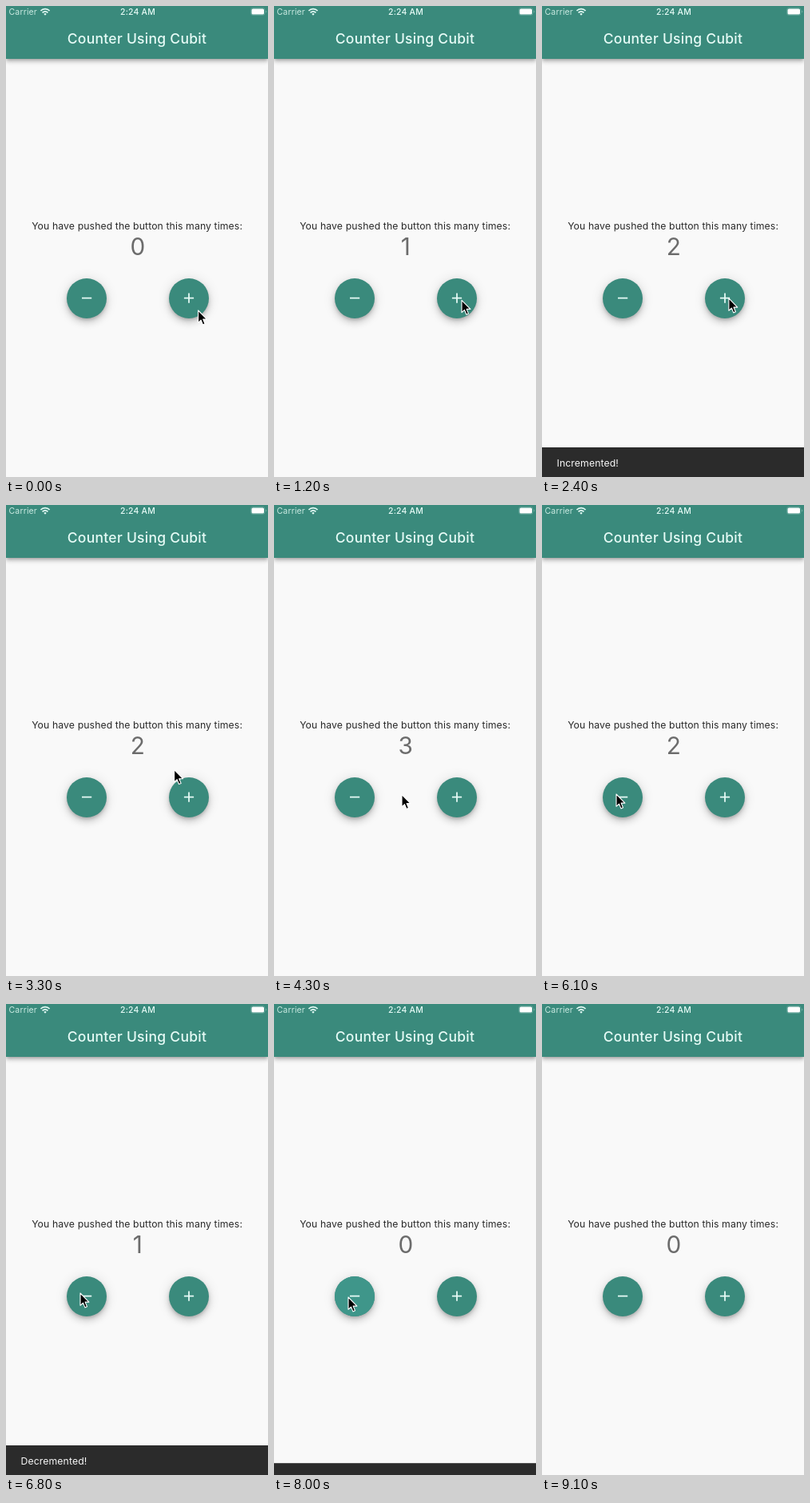
An HTML page for the animation above (9900 ms loop, 328 by 588 pixels).

```html
<!DOCTYPE html>
<html lang="en">
<head>
<meta charset="utf-8">
<title>Counter</title>
<style>
html, body { margin: 0; width: 100%; height: 100%; overflow: hidden; background: #f9f9f9; }
#stage { position: relative; width: 328px; height: 588px; overflow: hidden; background: #f9f9f9; }
#stage > * { position: absolute; }
.bar {
  left: 0; top: 0; width: 328px; height: 66px; background: #3a8a7c;
  box-shadow: 0 2px 3.5px -1px #0003, 0 3.5px 4.5px #00000024, 0 1px 9px #0000001f;
}
.fab {
  top: 340px; width: 50px; height: 50px; border-radius: 50%; background: #3a8a7c;
  box-shadow: 0 2.6px 4.4px -1px #0003, 0 5.2px 8.8px #00000024, 0 1px 15.8px #0000001f;
}
.fab i { display: block; width: 100%; height: 100%; border-radius: 50%; background: #3f968a; opacity: 0; }
svg { left: 0; top: 0; }
text { font-family: Inter, Roboto, sans-serif; }
.mid { text-anchor: middle; }
.status { font-size: 10.5px; letter-spacing: .16px; }
.title { font-size: 17.5px; font-weight: 500; letter-spacing: .27px; fill: #e6fbf6; }
.body { font-size: 12.25px; letter-spacing: .1px; fill: #2a2a2a; }
.count { font-size: 29.75px; fill: #6c6c6c; }
.note { font-size: 12.25px; letter-spacing: .1px; fill: #f7f7f7; }
</style>
</head>
<body>
<div id="stage">
  <div class="bar"></div>
  <div class="fab" style="left:76px"><i id="minus"></i></div>
  <div class="fab" style="left:204px"><i id="plus"></i></div>
  <svg width="328" height="588" viewBox="0 0 328 588">
    <text class="status" x="3.5" y="11" fill="#c9e9e1">Carrier</text>
    <g fill="none" stroke="#e6fbf6" stroke-width="1.7">
      <path d="M43.4 6a8 8 0 0 1 11.2 0M45.6 8.3a4.8 4.8 0 0 1 6.8 0"/>
      <path d="M47.3 9.9a2.4 2.4 0 0 1 3.4 0L49 11.7z" fill="#e6fbf6" stroke="none"/>
    </g>
    <text class="status mid" x="165" y="11" font-weight="500" fill="#e6fbf6">2:24 AM</text>
    <rect x="306.5" y="2.5" width="17.5" height="9" rx="2.6" fill="none" stroke="#e6fbf6" stroke-opacity=".18"/>
    <rect x="307.5" y="3.4" width="15.5" height="7.2" rx="1.6" fill="#fff"/>
    <path d="M325.2 5.5q1.2 .4 1.2 1.5t-1.2 1.5z" fill="#e6fbf6" fill-opacity=".3"/>

    <text class="title mid" x="164" y="47">Counter Using Cubit</text>
    <text class="body mid" x="164.1" y="278.5">You have pushed the button this many times:</text>
    <text class="count mid" id="count" x="164.8" y="311">0</text>
    <path d="M95 364.7h12.2M222.9 364.7h12.2M229 358.6v12.2" stroke="#e6fbf6" stroke-width="1.75"/>

    <g id="snack">
      <rect y="551" width="328" height="38" fill="#2b2b2b"/>
      <text class="note" id="note" x="18.5" y="575"></text>
    </g>
    <path id="cursor" d="M0 0V15.3L3.5 12.1 5.9 17.9 8.5 16.8 6.1 11.1H10.9Z" fill="#000" stroke="#fff" stroke-width="1.1" stroke-linejoin="round"/>
  </svg>
</div>
<script>
const LOOP = 9900, STEP = 100, SLIDE = 250, HOLD = 300, SNACK_H = 37;
const $ = id => document.getElementById(id);
const clamp = v => Math.min(1, Math.max(0, v));

// taps: start time, change of the counter
const taps = [[410, 1], [1922, 1], [3422, 1], [4960, -1], [6430, -1], [7922, -1]];

// pointer: time, x, y
const path = [
  [0, 240.6, 380], [300, 235, 367.3], [2300, 235, 367.3], [2800, 224, 345],
  [3300, 210.6, 330.6], [3500, 227, 362], [3900, 227, 362], [4700, 93, 361],
  [7000, 93, 361], [7300, 93, 366], [8400, 93, 366], [8900, -14, 440]
];

// cubic-bezier(.4, 0, .2, 1)
function ease(x) {
  let lo = 0, hi = 1;
  for (let i = 0; i < 24; i++) {
    const u = (lo + hi) / 2, v = 1 - u;
    if (1.2 * v * v * u + .6 * v * u * u + u ** 3 < x) lo = u; else hi = u;
  }
  return lo * lo * (3 - 2 * lo);
}

function pointerAt(t) {
  const i = path.findIndex(p => p[0] > t);
  if (i < 0) return null;
  const [t0, x0, y0] = path[i - 1], [t1, x1, y1] = path[i];
  const k = (t - t0) / (t1 - t0), s = k * k * (3 - 2 * k);
  return [x0 + (x1 - x0) * s, y0 + (y1 - y0) * s];
}

function render(t) {
  const done = taps.filter(tap => tap[0] <= t);
  $('count').textContent = done.reduce((sum, tap) => sum + tap[1], 0);

  const [start, dir] = done[done.length - 1] || [-LOOP, 1];
  const age = t - start, rise = clamp(age / SLIDE);
  const fall = clamp((age - SLIDE - HOLD) / SLIDE);
  const shown = ease(fall > 0 ? 1 - fall : rise);
  $('snack').setAttribute('transform', `translate(0 ${SNACK_H * (1 - shown)})`);
  $('snack').style.display = shown < .01 ? 'none' : '';
  $('note').textContent = dir > 0 ? 'Incremented!' : 'Decremented!';
  $('note').style.opacity = ease(clamp((rise - .72) / .28));

  const glow = clamp((290 - age) / 200);
  $('plus').style.opacity = dir > 0 ? glow : 0;
  $('minus').style.opacity = dir < 0 ? glow : 0;

  const pos = pointerAt(t);
  $('cursor').style.display = pos ? '' : 'none';
  if (pos) $('cursor').setAttribute('transform', `translate(${pos[0]} ${pos[1]})`);
}

const origin = performance.now();
function tick() {
  const t = Math.max(0, performance.now() - origin) % LOOP;
  render(Math.floor(t / STEP) * STEP);
  requestAnimationFrame(tick);
}
tick();
</script>
</body>
</html>
```
